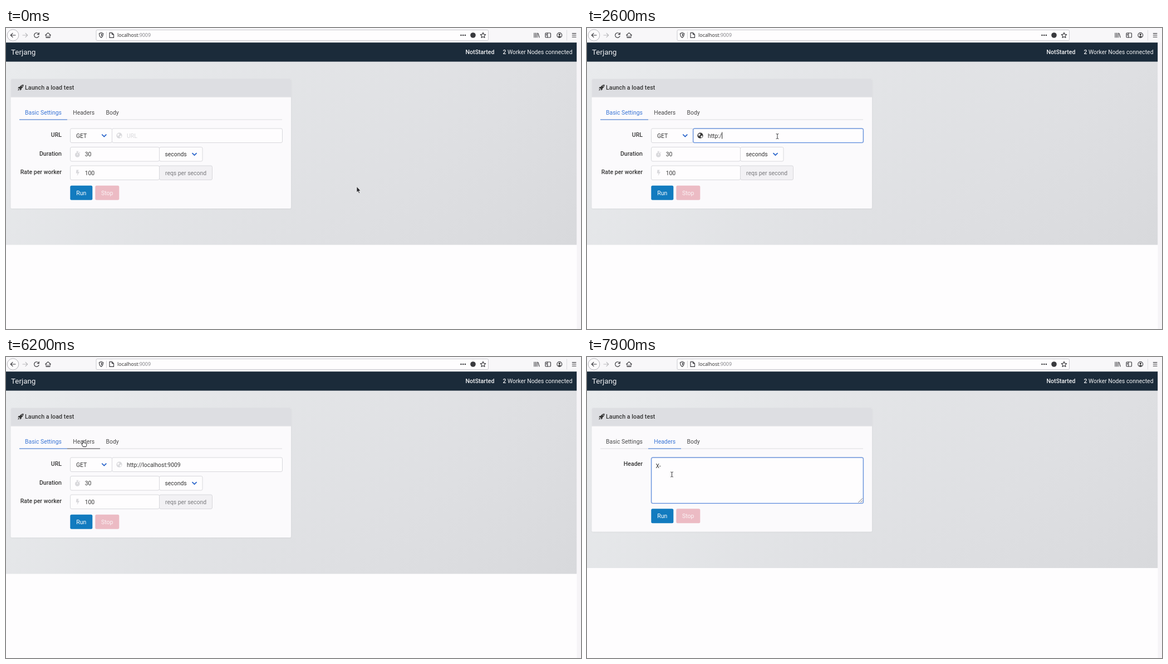
An HTML page that plays this animation: 1033x542 px, repeating every 8 s.

```html
<!DOCTYPE html>
<html lang="en">
<head>
<meta charset="utf-8">
<title>Load test</title>
<style>
  html, body { margin: 0; height: 100%; overflow: hidden; background: #fefdfe; }
  svg { display: block; width: 100vw; height: 100vh; font: 10.4px Roboto, sans-serif; fill: #363636; }
  text { white-space: pre; }
  .m { font-weight: 500; }
  .end { text-anchor: end; }
  .mid { text-anchor: middle; }
  .white { fill: #fff; }
  .faint { fill: #d9d9dc; }
  .line { fill: none; stroke: #3a3a3e; stroke-width: 1.15; stroke-linecap: round; stroke-linejoin: round; }
  .field { fill: #fefdfe; stroke: #d8d8dc; }
  .chev { fill: none; stroke: #3069cc; stroke-width: 1.9; stroke-linecap: round; stroke-linejoin: round; }
  .focus { fill: none; stroke: #5c8bdc; }
  .glow { fill: none; stroke: #3273dc; stroke-opacity: .22; stroke-width: 2; }
  .cursor { fill: #26262a; stroke: #fff; stroke-width: .7; }
</style>
</head>
<body>
<svg viewBox="0 0 1033 542" preserveAspectRatio="none">
  <defs>
    <linearGradient id="bg" gradientUnits="userSpaceOnUse" x1="229" y1="-124" x2="795" y2="576">
      <stop stop-color="#e9ebed"/><stop offset=".7" stop-color="#dedfe2"/><stop offset="1" stop-color="#d8d9dc"/>
    </linearGradient>
    <filter id="shadow" x="-5%" y="-5%" width="110%" height="112%">
      <feDropShadow dx="0" dy=".5" stdDeviation="1.5" flood-opacity=".06"/>
    </filter>
  </defs>

  <!-- browser toolbar -->
  <rect width="1033" height="26.5" fill="#f8f7f9"/>
  <circle cx="12.5" cy="13" r="10.3" fill="#fdfcfd" stroke="#b5b5ba"/>
  <g class="line">
    <path d="M17 13H8.5M12 9.3L8.3 13L12 16.7"/>
    <path d="M30 13H38.5M35 9.3L38.7 13L35 16.7" stroke="#b8b8bc"/>
    <path d="M58.6 10.8A4.3 4.3 0 1 0 59 14.5M59.3 8.5V11.6H56.2"/>
    <path d="M70.7 13L75.5 8.6L80.3 13M72.2 12.5V17.3H78.8V12.5M75.5 17V14"/>
  </g>
  <rect x="162" y="3.5" width="704.5" height="19" rx="2" fill="#fefdfe" stroke="#c9c9ce"/>
  <g class="line">
    <path d="M171 8.6L174.6 9.8C174.6 14 173.5 16 171 17.4C168.5 16 167.4 14 167.4 9.8Z"/>
    <path d="M171 10.5V15.3C172.5 14.2 172.9 13 173 11Z" fill="#3a3a3e" stroke="none"/>
    <path d="M186 8.6H190.5L193.5 11.6V17.4H186ZM190.5 8.6V11.6H193.5"/>
    <path d="M180.5 7V19" stroke="#d2d2d6" stroke-width="1"/>
    <path d="M857 8.3L858.4 11.4L861.8 11.8L859.3 14.1L860 17.5L857 15.8L854 17.5L854.7 14.1L852.2 11.8L855.6 11.4Z"/>
    <path d="M949 9V17M951.6 9V17M954.2 9V17M956 9.5L958 17"/>
    <rect x="969" y="9" width="9.5" height="8" rx="1"/><path d="M972.8 9V17M970.5 11.3H971.3M970.5 13H971.3"/>
    <circle cx="994.3" cy="13" r="4.4"/>
    <path d="M1007.5 4V22" stroke="#dddde1" stroke-width="1"/>
    <path d="M1017.3 9.8H1024M1017.3 13H1024M1017.3 16.2H1024"/>
  </g>
  <circle cx="994.3" cy="11.9" r="1.7"/><path d="M991.3 15.7Q994.3 12.7 997.3 15.7L994.3 17Z"/>
  <circle cx="839" cy="13" r="4.8" fill="#3a3a3e"/>
  <g fill="#3a3a3e"><circle cx="817.5" cy="13" r="1.3"/><circle cx="821.2" cy="13" r="1.3"/><circle cx="824.9" cy="13" r="1.3"/></g>
  <text x="200" y="16.3" font-family="Noto Sans, sans-serif" font-size="8.85">localhost<tspan fill="#85858a">:9009</tspan></text>

  <!-- page -->
  <rect y="60" width="1025.5" height="330.5" fill="url(#bg)" id="hero"/>
  <rect y="26.2" width="1025.5" height="34.4" fill="#1b2b3a"/>
  <rect x="1025.5" y="26.2" width="7.5" height="515.8" fill="#f6f4f7"/>
  <g fill="#f2f3f5">
    <text x="9" y="47.5" font-size="13.4">Terjang</text>
    <text x="877.5" y="47" class="m end" font-size="10.6">NotStarted</text>
    <text x="1017.5" y="47" class="end"><tspan class="m">2</tspan> Worker Nodes connected</text>
  </g>

  <rect id="card" x="8.5" y="92" width="503.5" height="233" rx="2" fill="#fbfafc" filter="url(#shadow)"/>
  <path d="M8.5 123.5V94Q8.5 92 10.5 92H510Q512 92 512 94V123.5Z" fill="#dddee2"/>
  <path d="M8.5 124H512" stroke="#d3d4d8"/>
  <path d="M31.6 102C28 102 26 104 24.7 106H22.7L21.2 108.8L23.7 108.7L25.1 110.1L25 112.6L27.7 111V109C30 107.5 31.7 105.5 31.6 102ZM23 109.7Q21.3 110.5 21.4 112.4Q23.3 112.5 24.1 110.8Z"/>
  <circle cx="29" cy="104.7" r=".9" fill="#dddee2"/>
  <text x="34" y="110.9" class="m" font-size="10.75">Launch a load test</text>

  <path d="M24 165H496" stroke="#dbdbdf"/>
  <path id="hover" d="M110 165H169" stroke="#4a4a4e"/>
  <path id="active" stroke="#3b76d6" stroke-width="1.1"/>
  <text id="tab0" x="34" y="155.6">Basic Settings</text>
  <text id="tab1" x="120.3" y="155.6">Headers</text>
  <text x="179.5" y="155.6" fill="#4a4a4a">Body</text>

  <g id="basic">
    <g class="m end" font-size="10.55">
      <text x="100" y="196">URL</text>
      <text x="100" y="229.8">Duration</text>
      <text x="100" y="263.4">Rate per worker</text>
    </g>
    <g class="field">
      <rect x="115.5" y="181" width="75" height="25.5" rx="2.5"/>
      <rect x="190.5" y="181" width="306" height="25.5" rx="2.5"/>
      <rect x="115.5" y="214.5" width="160" height="25.5" rx="2.5"/>
      <rect x="275.5" y="214.5" width="77.5" height="25.5" rx="2.5"/>
      <rect x="115.5" y="248" width="160" height="25.5" rx="2.5"/>
      <rect x="275.5" y="248" width="95" height="25.5" rx="2.5" fill="#f2f1f4"/>
    </g>
    <g id="urlFocus">
      <rect class="glow" x="190.5" y="181" width="306" height="25.5" rx="2.5"/>
      <rect class="focus" x="190.8" y="181" width="305.5" height="25.5" rx="2.5"/>
    </g>
    <path class="chev" d="M172.8 192.2L176.3 195.7L179.8 192.2M335 225.7L338.5 229.2L342 225.7"/>
    <g id="globe">
      <circle cx="203.5" cy="193.7" r="5.1"/>
      <path d="M200 191L203 190L204 192L202 193L202.5 195L200.5 194.5ZM204 194.5L207 193.5L207.5 196L205 198Z" fill="#fefdfe"/>
    </g>
    <g class="faint">
      <circle cx="128.3" cy="228.4" r="4.3"/>
      <path d="M126.5 221.8H130.1V223H129V224.5H127.6V223H126.5ZM131.3 224L132.3 223.2L133.2 224.2L132.3 225.2Z"/>
      <path d="M128.3 226V228.8" stroke="#fefdfe"/>
      <path d="M126.5 255.5H130.5L129.3 259H132L127.6 266.5L128.5 261.5H125.7Z"/>
    </g>
    <text x="126" y="197.5">GET</text>
    <text id="url" x="217" y="197.5"></text>
    <text x="141.7" y="231">30</text>
    <text x="285.5" y="231">seconds</text>
    <text x="141.7" y="264.6">100</text>
    <text x="286" y="264.6" fill="#7a7a7e">reqs per second</text>
  </g>

  <g id="headers">
    <text x="100" y="196" class="m end" font-size="10.55">Header</text>
    <rect class="field" x="115.5" y="181" width="381" height="82.5" rx="2.5"/>
    <g id="areaFocus">
      <rect class="glow" x="115.5" y="181" width="381" height="82.5" rx="2.5"/>
      <rect class="focus" x="115.7" y="181" width="380.6" height="82.5" rx="2.5"/>
    </g>
    <path d="M487.5 262L495 254.5M491.5 262L495 258.5" stroke="#6a6a6e"/>
    <text id="header" x="123.5" y="200"></text>
    <g id="hint" class="faint"><text x="123.5" y="200">Key: Value</text><text x="123.5" y="215.5">Key: Value</text></g>
  </g>

  <g id="buttons">
    <rect x="115.3" y="283.8" width="40" height="26" rx="2.5" fill="#127bbf"/>
    <rect x="160.3" y="283.8" width="43" height="26" rx="2.5" fill="#ecbbc4"/>
    <g class="mid white"><text x="135.3" y="300.6">Run</text><text x="181.7" y="300.6" fill="#fbf3f5">Stop</text></g>
  </g>

  <rect id="caret" width="1" height="12" fill="#222"/>
  <g id="pointer">
    <path id="arrow" class="cursor" d="M0 0V10.5L2.4 8.4L4 12.2L5.7 11.4L4.1 7.8H7.2Z"/>
    <path id="beam" d="M-2.3 -4.5Q0 -4.5 0 -3.2Q0 -4.5 2.3 -4.5M0 -3.5V3.5M-2.3 4.5Q0 4.5 0 3.2Q0 4.5 2.3 4.5" fill="none" stroke="#26262a" stroke-width=".9"/>
    <path id="hand" d="M-1 1Q0 -.7 1 1V4.7Q2.3 3.8 3 5Q4.3 4.3 4.9 5.6Q6.3 5.2 6.4 6.8Q6.5 9.5 5.3 11.5H-.2Q-1.3 9 -2.8 7.4Q-2.6 5.8 -1 6.9Z" fill="#fff" stroke="#26262a"/>
  </g>
</svg>
<script>
const $ = id => document.getElementById(id);
const show = (id, on) => $(id).style.display = on ? '' : 'none';
const LOOP = 8000, FOCUS = 1300, BLUR = 6150, SWITCH = 6300, AREA_FOCUS = 7000;
const ADDRESS = 'http://localhost:9009', BLUE = '#3b76d6', GREY = '#4a4a4a';

// time, x, y of the pointer
const path = [
  [400, 630, 285.5], [1150, 342, 195], [5350, 342, 195], [6050, 138.5, 150],
  [6200, 138.5, 150], [6300, 140, 156.5], [6500, 140, 156.5], [6900, 152.5, 211.5]
];

// time each key lands
const urlKeys = [...ADDRESS].map((_, i) => i < 15 ? 1990 + i * 115 : 3790 + (i - 15) * 190);
const headerKeys = [7300, 7390];
const typed = (keys, t) => keys.filter(k => k <= t).length;

function pointerAt(t) {
  const i = path.findIndex(p => p[0] > t);
  if (i < 0) return path.at(-1).slice(1);
  if (!i) return path[0].slice(1);
  const [t0, x0, y0] = path[i - 1], [t1, x1, y1] = path[i];
  const k = (t - t0) / (t1 - t0), e = k * k * (3 - 2 * k);
  return [x0 + (x1 - x0) * e, y0 + (y1 - y0) * e];
}

function setCaret(node, keys, start, t) {
  const n = typed(keys, t), last = n ? keys[n - 1] : start;
  show('caret', (t - last) % 1000 < 500);
  const x = +node.getAttribute('x') + (n ? node.getComputedTextLength() : 0);
  $('caret').setAttribute('x', x);
  $('caret').setAttribute('y', node.getAttribute('y') - 10);
}

function draw(t) {
  const onHeaders = t >= SWITCH;
  const urlFocus = t >= FOCUS && t < BLUR, areaFocus = t >= AREA_FOCUS;
  const shift = onHeaders ? -10.5 : 0;

  show('basic', !onHeaders);
  show('headers', onHeaders);
  $('hero').setAttribute('height', 330.5 + shift);
  $('card').setAttribute('height', 233 + shift);
  $('buttons').setAttribute('transform', `translate(0 ${shift})`);
  $('active').setAttribute('d', onHeaders ? 'M110 165H169' : 'M24 165H110');
  $('tab0').setAttribute('fill', onHeaders ? GREY : BLUE);
  $('tab1').setAttribute('fill', onHeaders ? BLUE : GREY);

  const n = typed(urlKeys, t), m = typed(headerKeys, t);
  $('url').textContent = n ? ADDRESS.slice(0, n) : 'URL';
  $('url').setAttribute('class', n ? '' : 'faint');
  $('globe').setAttribute('class', urlFocus ? '' : 'faint');
  show('urlFocus', urlFocus);
  $('header').textContent = 'X-'.slice(0, m);
  show('hint', !m);
  show('areaFocus', areaFocus);

  if (urlFocus) setCaret($('url'), urlKeys, FOCUS, t);
  else if (areaFocus) setCaret($('header'), headerKeys, AREA_FOCUS, t);
  else show('caret', false);

  const [x, y] = pointerAt(t);
  const hand = x > 24 && x < 213 && y > 138 && y < 166;
  const beam = x > (onHeaders ? 115 : 190) && x < 496 && y > 181 && y < (onHeaders ? 263 : 207);
  show('hand', hand);
  show('beam', beam);
  show('arrow', !hand && !beam);
  show('hover', hand && !onHeaders && x > 110 && x < 169);
  $('pointer').setAttribute('transform', `translate(${x} ${y})`);
}

const start = performance.now();
function tick() {
  draw((performance.now() - start) % LOOP);
  requestAnimationFrame(tick);
}
tick();
</script>
</body>
</html>
```
